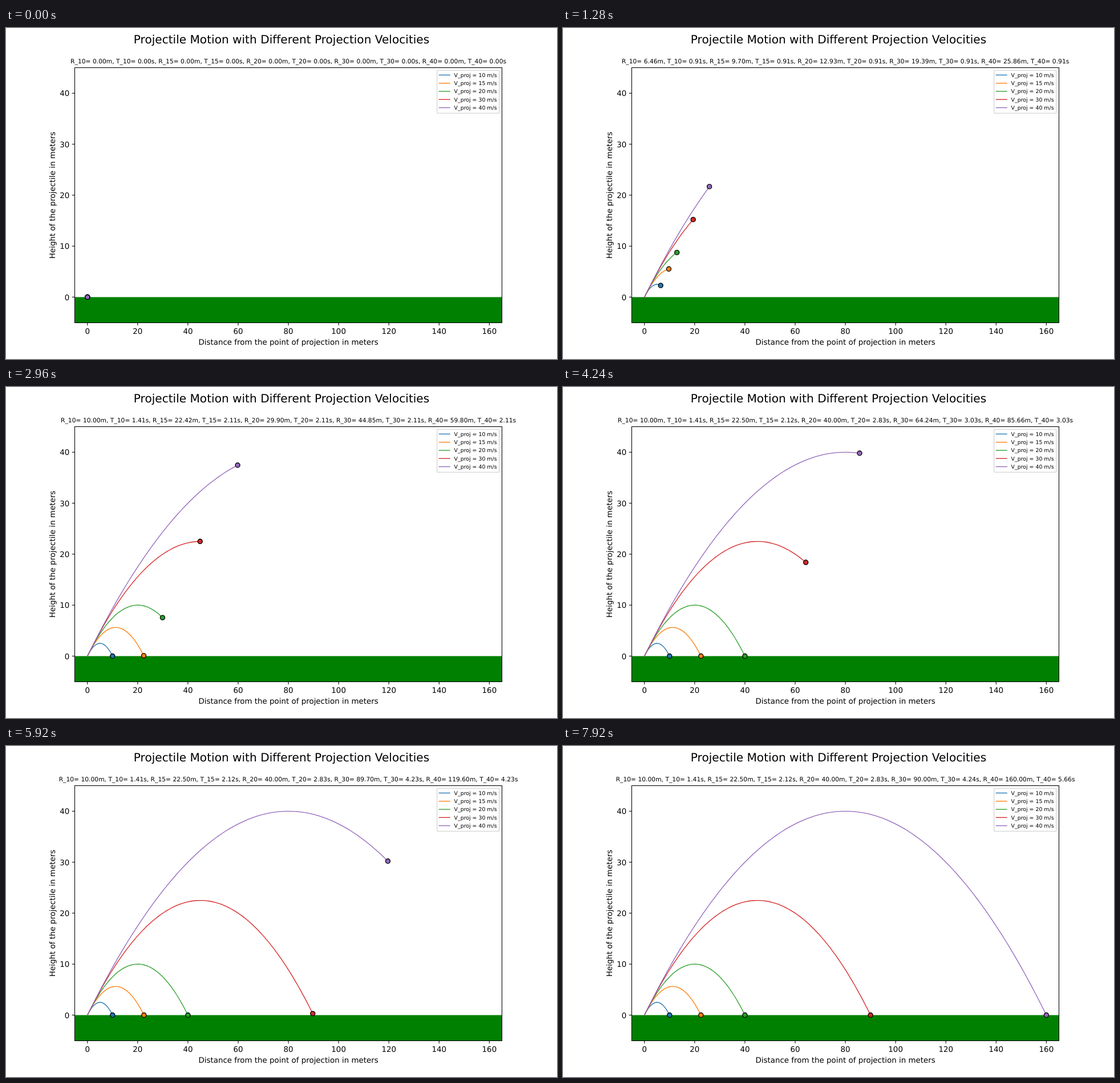
Recreate the animation shown at these times as an HTML page. Size 966 by 580 pixels, loop 8000 ms.

```html
<!DOCTYPE html>
<html lang="en">
<head>
<meta charset="utf-8">
<title>Projectile Motion</title>
<style>
  html, body { margin: 0; width: 100%; height: 100%; overflow: hidden; background: #fff; }
  svg { display: block; }
  text {
    font: 13.42px "DejaVu Sans", sans-serif;
    font-variant-ligatures: none;
    text-rendering: geometricPrecision;
    text-anchor: middle;
    white-space: pre;
  }
  text.heading { font-size: 20.12px; }
  text.status { font-size: 10.73px; }
  text.legend { font-size: 9.39px; text-anchor: start; }
  text.right { text-anchor: end; }
  .axis { fill: none; stroke: #000; stroke-width: 1.07; }
  .curve { fill: none; stroke-width: 1.34; stroke-linecap: square; stroke-linejoin: round; }
  .ball { stroke: #000; stroke-width: 1.34; }
</style>
</head>
<body>
<svg id="stage" width="966" height="580" viewBox="0 0 966 580"></svg>
<script>
const LOOP = 8000, STEP = 80, LAST = LOOP / STEP - 1;
const GRAVITY = 10, COS45 = Math.SQRT1_2;
const left = 120.5, right = 869.5, top_ = 69.5, bottom = 516.5;

const px = x => 142.77 + x * 4.4038;
const py = y => 471.54 - y * 8.932;

const shots = [
  [10, '#1f77b4'], [15, '#ff7f0e'], [20, '#2ca02c'], [30, '#d62728'], [40, '#9467bd']
].map(([speed, color]) => ({
  speed, color, flight: 2 * speed * COS45 / GRAVITY
}));
const timeStep = shots[4].flight / LAST;

const text = (x, y, str, cls = '', extra = '') =>
  `<text x="${x}" y="${y}" class="${cls}" ${extra}>${str}</text>`;
const range = (end, step) => Array.from({ length: end / step + 1 }, (_, i) => i * step);

const xTicks = range(160, 20).map(v =>
  `<path class="axis" d="M${px(v)} ${bottom}v4.7"/>` + text(px(v), 535.8, v));
const yTicks = range(40, 10).map(v =>
  `<path class="axis" d="M${left} ${py(v)}h-4.7"/>` + text(111.3, py(v) + 5.1, v, 'right'));
const legend = shots.map(({ speed, color }, i) => {
  const y = 82.4 + i * 14.3;
  return `<path class="curve" stroke="${color}" d="M759.3 ${y}H778.1"/>` +
    text(785.6, y + 3.4, `V_proj = ${speed} m/s`, 'legend');
});

const stage = document.getElementById('stage');
stage.innerHTML = `
  <rect x="${left}" y="${py(0)}" width="${right - left}" height="${bottom - py(0)}" fill="#008000"/>
  ${shots.map(s => `<path class="curve" stroke="${s.color}"/>`).join('')}
  ${shots.map(s => `<circle class="ball" r="4.03" fill="${s.color}"/>`).join('')}
  <rect class="axis" x="${left}" y="${top_}" width="${right - left}" height="${bottom - top_}"/>
  ${xTicks.join('')}${yTicks.join('')}
  <rect x="755.6" y="74.3" width="109.1" height="75.1" rx="1.9"
    fill="#fff" stroke="#ccc" stroke-width="1.34" opacity=".8"/>
  ${legend.join('')}
  ${text(483, 27, 'Projectile Motion with Different Projection Velocities', 'heading')}
  ${text(495.1, 555, 'Distance from the point of projection in meters')}
  ${text(0, 0, 'Height of the projectile in meters', '', 'transform="translate(86 293) rotate(-90)"')}
  ${text(495.1, 61.5, '', 'status')}`;

const curves = stage.querySelectorAll('path.curve');
const balls = stage.querySelectorAll('.ball');
const status = stage.querySelector('.status');

function locate({ speed, flight }, step) {
  const t = Math.min(step * timeStep, flight);
  const x = speed * COS45 * t;
  return { t, x, y: x - GRAVITY * t * t / 2 };
}

function draw(step) {
  status.textContent = shots.map((shot, i) => {
    const points = range(step, 1).map(s => locate(shot, s));
    const { t, x, y } = points[step];
    curves[i].setAttribute('d', 'M' + points.map(p => `${px(p.x)} ${py(p.y)}`).join('L'));
    balls[i].setAttribute('cx', px(x));
    balls[i].setAttribute('cy', py(y));
    return `R_${shot.speed}= ${x.toFixed(2)}m, T_${shot.speed}= ${t.toFixed(2)}s`;
  }).join(', ');
}

let start;
function tick(now) {
  start ??= now;
  draw(Math.floor((now - start) % LOOP / STEP));
  requestAnimationFrame(tick);
}
draw(0);
requestAnimationFrame(tick);
</script>
</body>
</html>
```
